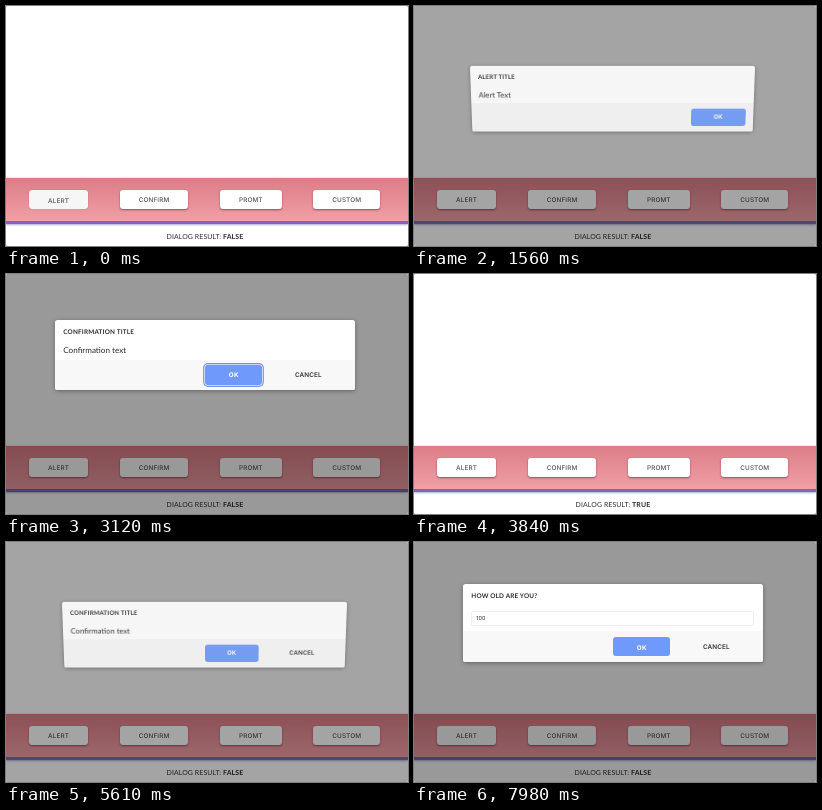
Recreate the animation shown at these times as an HTML page. Size 402 by 240 pixels, loop 8 s.

```html
<!DOCTYPE html>
<html lang="en">
<head>
<meta charset="utf-8">
<title>Dialogs</title>
<style>
html, body { margin: 0; width: 100%; height: 100%; overflow: hidden; background: #bbb; }
#stage { position: relative; width: 402px; height: 240px; overflow: hidden; border-radius: 2px;
  background: #fff; font: 6.95px Lato, sans-serif; color: #2c2c2c; text-rendering: geometricPrecision; }
#stage div, button { position: absolute; box-sizing: border-box; white-space: nowrap; }
#bar { top: 172px; width: 402px; height: 46px; background: linear-gradient(#dc7d87, #f09fa5);
  border-bottom: 3px solid #7d66bd; box-shadow: 0 0 1px #b99, 0 1px 2px #a9b4e4; }
button { border: 0; padding: 0; border-radius: 3px; background: #fff; color: #555;
  font: 500 6.4px Inter, sans-serif; letter-spacing: .1px; text-rendering: inherit; }
.trigger { top: 184px; height: 19px; padding-top: 1px; box-shadow: 0 1px 2px rgba(70, 20, 40, .55); }
.trigger.down { background: #f6f6f6; padding-top: 2px; box-shadow: 0 0 1px rgba(70, 20, 40, .5); }
#result { left: 0; top: 224px; width: 397.8px; line-height: 12px; text-align: center;
  letter-spacing: .1px; transform: translateY(.5px); }
#shade { inset: 0; background: #000; }
.dialog { left: 49.3px; width: 299.4px; background: #fff; border-radius: 2.5px; overflow: hidden;
  box-shadow: 0 1px 4px rgba(0, 0, 0, .35); }
.title { left: 8px; top: 7px; line-height: 11px; font-size: 6.4px; font-weight: 700; letter-spacing: .18px; }
.text { left: 8px; top: 24.5px; line-height: 12px; font-size: 8.1px; }
.input { left: 8px; top: 27px; width: 283px; height: 15px; padding-left: 4px; border: 1px solid #f0f0f0;
  border-radius: 2px; font: 5.5px/14px Inter, sans-serif; }
.foot { left: 0; bottom: 0; width: 100%; height: 30.5px; background: #f8f8f8; }
.foot button { top: 5.5px; height: 19.5px; font-weight: 600; }
.foot .ok { width: 57.5px; background: #6f9afb; color: #fff; font-weight: 700; }
.foot .cancel { left: 215px; width: 76px; background: none; color: #333; }
.ok.ring { box-shadow: 0 0 0 .8px #e4ebfb, 0 0 0 1.9px #7196e8; }
.foot .down { padding-top: 2.5px; }
</style>
</head>
<body>
<div id="stage">
  <div id="bar"></div>
  <div id="result">DIALOG RESULT: <b></b></div>
</div>
<script>
const LOOP = 8000, MOVE = 600;
const stage = document.getElementById('stage');
const answer = document.querySelector('#result b');

function add(parent, tag, className, css = '', text = '') {
  const el = document.createElement(tag);
  el.className = className;
  el.style.cssText = css;
  el.textContent = text;
  parent.append(el);
  return el;
}

const triggers = [['ALERT', 23, 59], ['CONFIRM', 113.7, 68.7], ['PROMT', 213.7, 62.3], ['CUSTOM', 307, 67.4]]
  .map(([label, x, w]) => add(stage, 'button', 'trigger', `left:${x}px;width:${w}px`, label));
const shade = add(stage, 'div', '');
shade.id = 'shade';

function makeDialog(title, text, isPrompt, hasCancel) {
  const height = isPrompt ? 77.5 : 70.5;
  const el = add(stage, 'div', 'dialog', `top:${81.1 - height / 2}px;height:${height}px`);
  add(el, 'div', 'title', '', title);
  add(el, 'div', isPrompt ? 'input' : 'text', '', text);
  const foot = add(el, 'div', 'foot');
  const ok = add(foot, 'button', 'ok', `left:${hasCancel ? 149.7 : 233}px`, 'OK');
  const cancel = hasCancel && add(foot, 'button', 'cancel', '', 'CANCEL');
  return { el, ok, cancel, isPrompt };
}

const alertBox = makeDialog('ALERT TITLE', 'Alert Text', false, false);
const confirmBox = makeDialog('CONFIRMATION TITLE', 'Confirmation text', false, true);
const promptBox = makeDialog('HOW OLD ARE YOU?', '100', true, true);
const dialogs = [alertBox, confirmBox, promptBox];

// press: trigger pushed, open: dialog enters, tap: dialog button pushed, close: dialog leaves
const visits = [
  { box: alertBox, trigger: 0, press: 0, open: 385, tap: 1320, close: 1440 },
  { box: confirmBox, trigger: 1, press: 2190, open: 2545, tap: 3150, close: 3240 },
  { box: confirmBox, trigger: 1, press: 4200, open: 4540, tap: 5370, close: 5490, cancels: true },
  { box: promptBox, trigger: 2, press: 6330, open: 6686, tap: 7870, close: LOOP },
];

const progress = (t, start) => Math.min(1, Math.max(0, (t - start) / MOVE));
const smooth = x => x * x * (3 - 2 * x);

function draw(t) {
  const visit = visits.find(v => t >= v.press && t < v.close + MOVE);
  triggers.forEach((el, i) => el.classList.toggle('down',
    !!visit && visit.trigger === i && t < visit.press + 200));
  answer.textContent = t >= 3240 && t < 5490 ? 'TRUE' : 'FALSE';

  const active = visit && t >= visit.open ? visit : null;
  dialogs.forEach(d => d.el.style.display = active && active.box === d ? 'block' : 'none');
  shade.style.opacity = 0;
  if (!active) return;

  const { box, tap, close, cancels } = active;
  const entering = (1 - progress(t, active.open)) ** 6;
  const leaving = smooth(progress(t, close));
  const away = leaving + entering * .45;
  const opacity = (1 - entering) * (1 - leaving);
  shade.style.opacity = .4 * opacity;
  box.el.style.opacity = opacity * (1 - entering);
  box.el.style.transform = away < .0005 ? 'none' :
    `perspective(750px) translate3d(0,${115 * away}px,${-410 * away}px) rotateX(${-105 * away}deg)`;

  const down = t >= tap && t < close;
  box.ok.classList.toggle('ring', !box.isPrompt && t < tap);
  box.ok.classList.toggle('down', down && !cancels);
  if (box.cancel) box.cancel.classList.toggle('down', down && !!cancels);
}

const began = performance.now();
function tick() {
  draw((performance.now() - began) % LOOP);
  requestAnimationFrame(tick);
}
tick();
</script>
</body>
</html>
```
